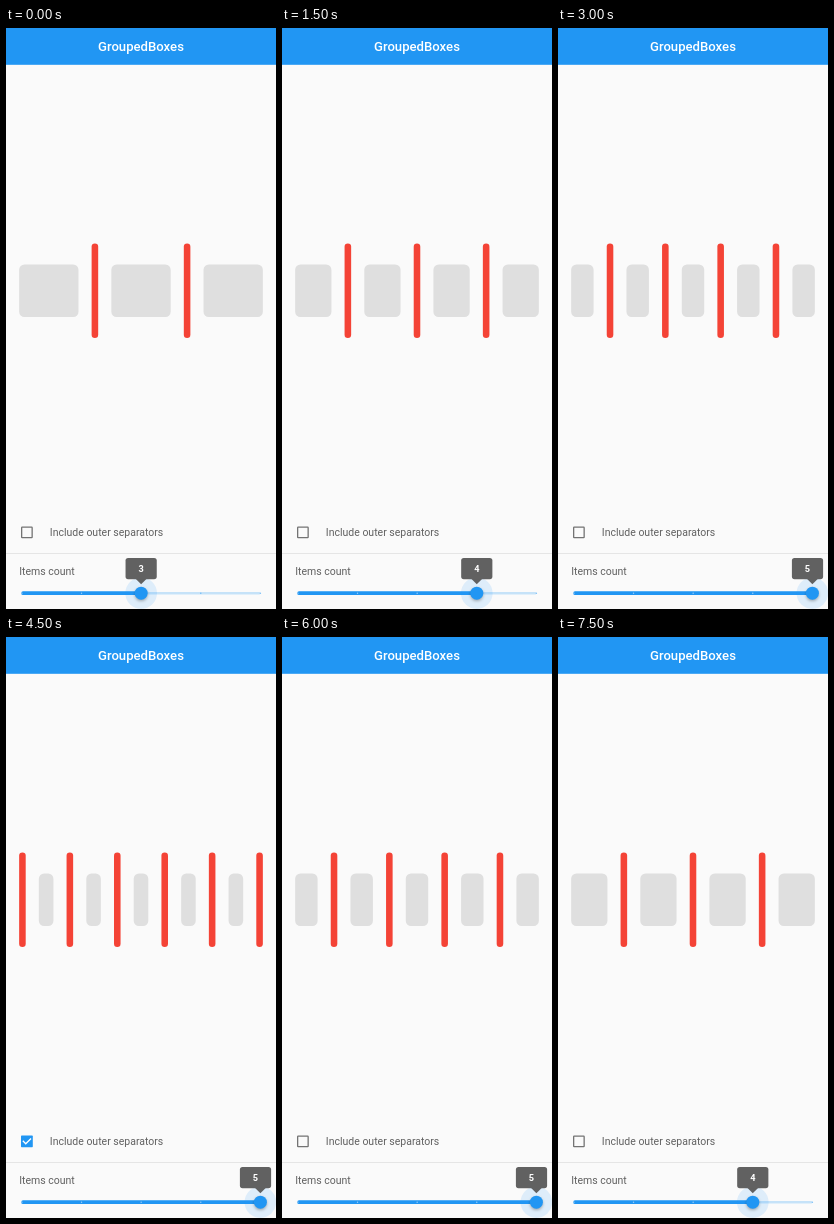
Animation, 270 px wide and 581 px high, one loop 9000 ms. Source, as an HTML page:

```html
<!DOCTYPE html>
<html lang="en">
<head>
<meta charset="utf-8">
<title>Row demo</title>
<style>
  html, body { margin: 0; width: 100%; height: 100%; overflow: hidden; background: #fafafa; }
  svg { display: block; width: 100%; height: 100%; }
  text { font-family: Roboto, sans-serif; font-size: 10.51px; fill: #616161; }
  .title { font-size: 13.14px; font-weight: 500; fill: #fff; text-anchor: middle; }
  .value { font-size: 9.2px; font-weight: 700; fill: #fff; text-anchor: middle; }
  .primary { fill: #2196f3; }
</style>
</head>
<body>
<svg viewBox="0 0 270 581">
  <defs>
    <filter id="soft" x="-50%" y="-50%" width="200%" height="200%">
      <feGaussianBlur stdDeviation="1.5"/>
    </filter>
  </defs>
  <rect width="270" height="581" fill="#fafafa"/>
  <rect class="primary" width="270" height="36.8"/>
  <text class="title" x="135" y="23.3">GroupedBoxes</text>

  <g id="row"></g>

  <rect id="box" x="15.65" y="499.15" width="10.5" height="10.5" rx=".5" fill="none" stroke="#737373" stroke-width="1.3"/>
  <g id="checked">
    <rect class="primary" x="15" y="498.5" width="11.8" height="11.8" rx=".7"/>
    <path d="M16.8 503.8l2.95 2.95 5.3-5.3" fill="none" stroke="#fff" stroke-width="1.3"/>
  </g>
  <text x="43.8" y="508.1">Include outer separators</text>
  <rect y="525" width="270" height=".8" fill="#e0e0e0"/>
  <text x="13.14" y="547.2">Items count</text>

  <rect x="15.8" y="563.9" width="238.5" height="2.6" rx="1.3" fill="#2196f3" fill-opacity=".24"/>
  <rect id="active" class="primary" x="15.2" y="563.2" height="3.9" rx="1.95"/>
  <g id="ticks"></g>
  <g id="thumb">
    <circle class="primary" r="15.8" fill-opacity=".13"/>
    <circle cy="1.4" r="6.4" fill-opacity=".3" filter="url(#soft)"/>
    <circle class="primary" r="6.5"/>
    <path d="M-5.3-14.3h10.6L0-9z" fill="#616161"/>
  </g>
  <g id="bubble">
    <rect x="-15.6" y="530" width="31.2" height="21.2" rx="2.6" fill="#616161"/>
    <text class="value" y="544.2"></text>
  </g>
</svg>
<script>
const STEP = 1500;
const STEPS = [
  { count: 3 }, { count: 4 }, { count: 5 },
  { count: 5, outer: true }, { count: 5 }, { count: 4 },
];
const LEFT = 13.14, WIDTH = 243.72, GAP = 13.14, BAR = 6.57;
const TRACK_LEFT = 15.9, TRACK_WIDTH = 238.5, TRACK_Y = 565.2;
const $ = id => document.getElementById(id);

const rect = (x, y, w, h, r, fill) =>
  `<rect x="${x}" y="${y}" width="${w}" height="${h}" rx="${r}" fill="${fill}"/>`;

function rowMarkup(count, outer) {
  const bars = outer ? count + 1 : count - 1;
  const gaps = outer ? 2 * count : 2 * (count - 1);
  const itemWidth = (WIDTH - bars * BAR - gaps * GAP) / count;
  let x = LEFT, markup = '';
  for (let i = 0; i < count + bars; i++) {
    const isBar = (i % 2 === 0) === !!outer;
    const w = isBar ? BAR : itemWidth;
    markup += isBar
      ? rect(x, 215.5, w, 94.6, 3.28, '#f44336')
      : rect(x, 236.5, w, 52.6, 5.26, '#dfdfdf');
    x += w + GAP;
  }
  return markup;
}

const stopX = value => TRACK_LEFT + TRACK_WIDTH * (value - 1) / 4;

function ticksMarkup(count) {
  return [1, 2, 3, 4, 5].map(value => {
    const fill = value <= count ? '#fff' : '#2196f3';
    return `<circle cx="${stopX(value)}" cy="${TRACK_Y}" r=".7" fill="${fill}" fill-opacity=".54"/>`;
  }).join('');
}

function draw({ count, outer }) {
  const x = stopX(count);
  $('row').innerHTML = rowMarkup(count, outer);
  $('box').style.display = outer ? 'none' : '';
  $('checked').style.display = outer ? '' : 'none';
  $('active').setAttribute('width', x - 15.2);
  $('ticks').innerHTML = ticksMarkup(count);
  $('thumb').setAttribute('transform', `translate(${x} ${TRACK_Y})`);
  $('bubble').setAttribute('transform', `translate(${Math.min(x, 249.5)} 0)`);
  $('bubble').querySelector('text').textContent = count;
}

let shown = -1;
function tick(now) {
  const index = Math.floor(now / STEP) % STEPS.length;
  if (index !== shown) draw(STEPS[shown = index]);
  requestAnimationFrame(tick);
}
draw(STEPS[0]);
requestAnimationFrame(tick);
</script>
</body>
</html>
```
